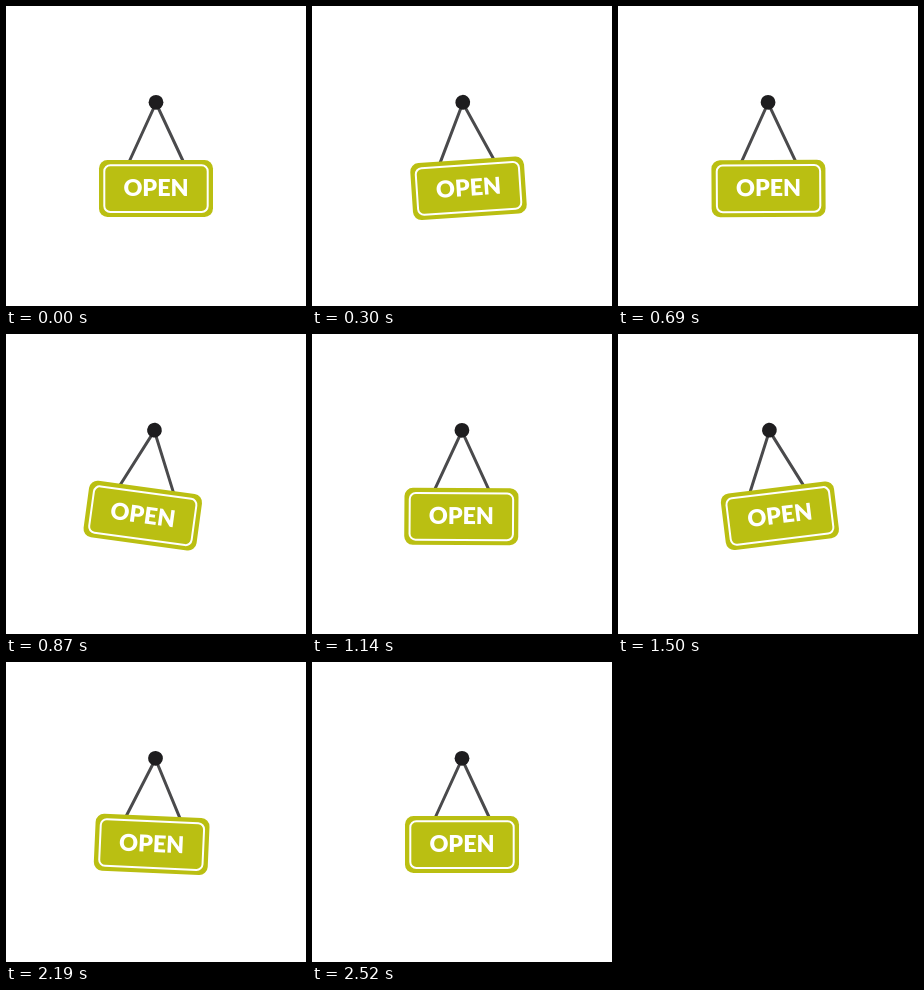
An HTML page that plays this animation: 300 px wide and 300 px high, repeating every 2730 ms.

```html
<!DOCTYPE html>
<html>
<head>
<meta charset="utf-8">
<style>
  html, body { margin: 0; width: 100%; height: 100%; overflow: hidden; background: #fff; }
  svg { display: block; width: 100vw; height: 100vh; }
  text { font: 900 23.3px Lato, sans-serif; fill: #fff; text-anchor: middle; }
</style>
</head>
<body>
<svg viewBox="0 0 300 300">
  <g id="sign">
    <path d="M123 156 150 97 177.500 156" fill="none" stroke="#4a4a4c" stroke-width="3"/>
    <circle cx="150" cy="96.300" r="7.400" fill="#1e1d1f"/>
    <rect x="93" y="154" width="114" height="57" rx="8.500" fill="#babf12"/>
    <rect x="98.300" y="159.300" width="103.400" height="46.700" rx="6" fill="none" stroke="#fff" stroke-width="2"/>
    <text x="150" y="190" textLength="">OPEN</text>
  </g>
</svg>
<script>
  const LOOP = 2730, STEP = 30;
  // [time in ms, swing in degrees]
  const swing = [[120, 0], [490, -8], [900, 8], [1395, -8], [1960, 4], [2520, 0]];
  const sign = document.getElementById('sign');
  sign.querySelector('text').removeAttribute('textLength');

  const ease = x => (1 - Math.cos(Math.PI * x)) / 2;

  function angleAt(t) {
    const next = swing.findIndex(([time]) => time > t);
    if (next < 1) return 0;
    const [t0, a0] = swing[next - 1], [t1, a1] = swing[next];
    return a0 + (a1 - a0) * ease((t - t0) / (t1 - t0));
  }

  const start = performance.now();
  function draw() {
    const t = (performance.now() - start) % LOOP;
    const stepped = t < 150 ? 0 : Math.floor(t / STEP) * STEP;
    sign.setAttribute('transform', `rotate(${angleAt(stepped)} 150 85)`);
    requestAnimationFrame(draw);
  }
  draw();
</script>
</body>
</html>
```
